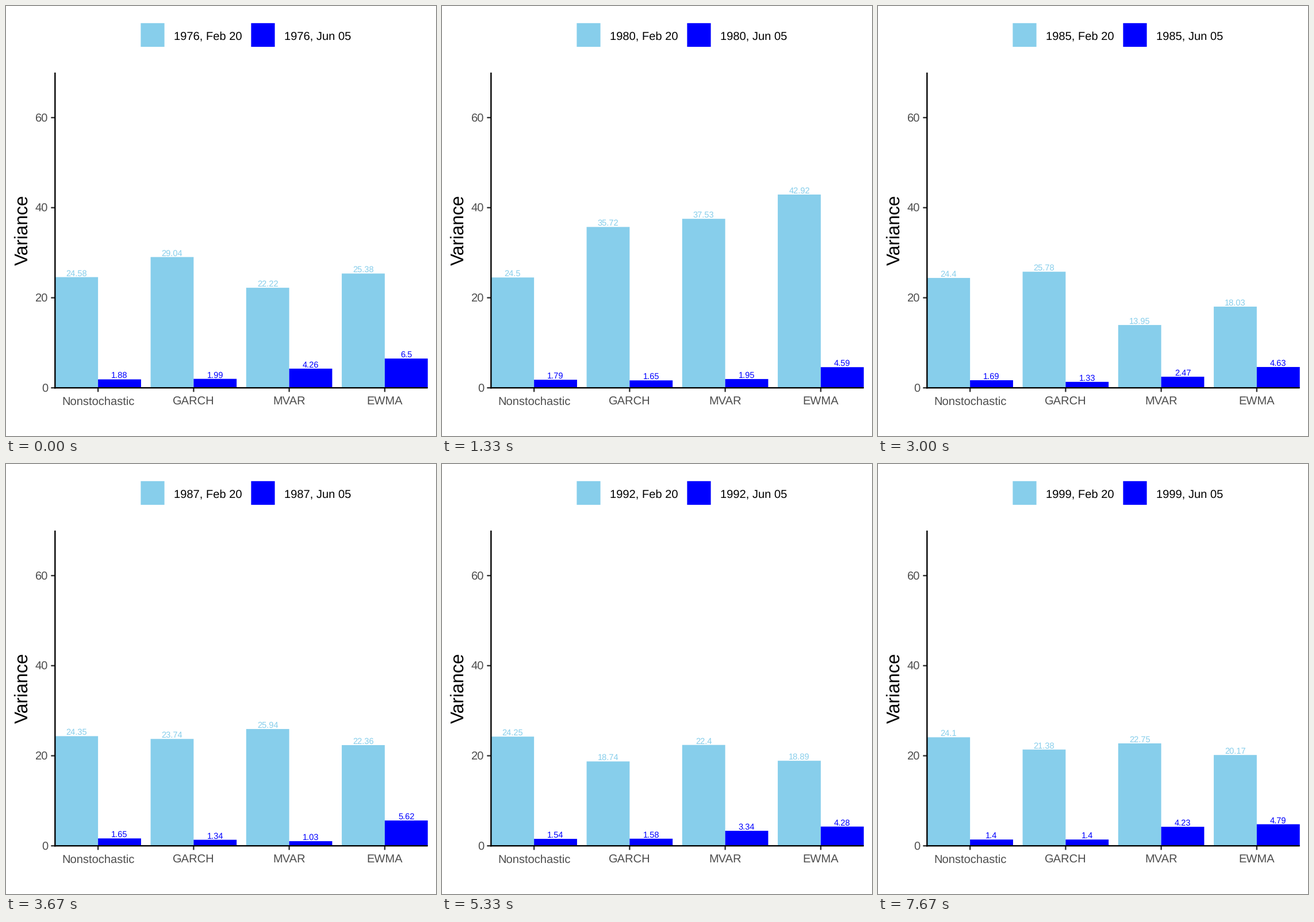
Write a matplotlib script that moves like this. It is 748 px wide and 748 px high and loops after 8 s.

```python
import matplotlib.pyplot as plt
import numpy as np
from matplotlib.animation import FuncAnimation
from matplotlib.patches import Rectangle

SIZE, DPI = 748, 100
PX = 72 / DPI
LOOP, STEP = 8000, 20
YEARS, FIRST_YEAR = 24, 1976
SKY, BLUE, GREY = "#87CEEB", "#0000FF", "#4D4D4D"
LEFT, RIGHT, TOP, BASE = 85.3, 733.7, 115.8, 664.2
UNIT = (BASE - TOP) / 70
PITCH = (RIGHT - LEFT) / 3.9
BAR = 0.45 * PITCH
MODELS = ["Nonstochastic", "GARCH", "MVAR", "EWMA"]

plt.rcParams["font.family"] = ["Liberation Sans", "DejaVu Sans"]
plt.rcParams["text.hinting"] = "none"

rng = np.random.default_rng(12)
k = np.arange(YEARS)
KEY_YEARS = [0, 4, 9, 13, 16, 19, 23]


def wander(*keys):
    """Series through the key points, with slight scatter in between."""
    scatter = rng.uniform(-0.1, 0.1, YEARS)
    scatter[KEY_YEARS] = 0
    return np.interp(k, KEY_YEARS, keys) * (1 + scatter)


def wave(period):
    return np.cos(2 * np.pi * k / period)


drift = 0.0209 * k
february = [
    24.584 - drift,
    wander(29.04, 35.72, 25.78, 21.3, 18.74, 26.06, 21.38),
    wander(22.22, 37.53, 13.95, 35.33, 22.4, 28.59, 22.75),
    wander(25.38, 42.92, 18.03, 30.78, 18.89, 27.15, 20.17),
]
june = [
    1.876 - drift,
    1.42 + 0.18 * wave(18) + 0.39 * np.exp(-k / 6),
    2.6 + 0.95 * wave(7.7) + 0.71 * wave(22),
    5.3 - 0.05 * k + 1.2 * wave(12.5),
]

fig = plt.figure(figsize=(SIZE / DPI, SIZE / DPI), dpi=DPI, facecolor="white")
ax = fig.add_axes([0, 0, 1, 1])
ax.set(xlim=(0, SIZE), ylim=(SIZE, 0))
ax.axis("off")


def label(x, y, text, px, color, ha="center", **kwargs):
    return ax.text(x, y, text, fontsize=px * PX, color=color,
                   ha=ha, va="baseline", **kwargs)


def box(x, y, w, h, color):
    return ax.add_patch(Rectangle((x, y), w, h, facecolor=color,
                                  linewidth=0, snap=False))


def stroke(xs, ys, color="black"):
    ax.plot(xs, ys, color=color, lw=2.4 * PX, solid_capstyle="butt",
            zorder=4, snap=False)


# Axes, ticks and their labels
for value in range(0, 61, 20):
    y = BASE - value * UNIT
    stroke([78.3, LEFT], [y, y], "#333333")
    label(73.3, y + 7.4, str(value), 20.2, GREY, "right")
centers = [LEFT + BAR + i * PITCH for i in range(len(MODELS))]
for x, name in zip(centers, MODELS):
    stroke([x, x], [BASE, 671.3], "#333333")
    label(x, 693.3, name, 20.2, GREY)
stroke([LEFT, LEFT], [TOP, BASE + 1.2])
stroke([LEFT - 1.2, RIGHT], [BASE, BASE])
label(37.6, (TOP + BASE) / 2, "Variance", 31.6, "black",
      rotation=90, rotation_mode="anchor")

# Legend
legend = []
for x, color, day in ((234.4, SKY, "Feb 20"), (426.4, BLUE, "Jun 05")):
    box(x, 29.8, 41.2, 41.2, color)
    legend.append((label(x + 57.4, 59.3, "", 20.1, "black", "left"), day))

# Bars with their value labels
bars = []
for x, light, dark in zip(centers, february, june):
    for left, series, color in ((x - BAR, light, SKY), (x, dark, BLUE)):
        bars.append((box(left, BASE, BAR, 0, color),
                     label(left + BAR / 2, BASE, "", 14.6, color), series))


def draw(i):
    # Each year begins on the step at or just before its third of a second
    year = (3 * i + 2) * STEP // 1000
    for text, day in legend:
        text.set_text(f"{FIRST_YEAR + year}, {day}")
    for rect, text, series in bars:
        top = BASE - series[year] * UNIT
        rect.set_y(top)
        rect.set_height(BASE - top)
        text.set_y(top - 2.2)
        text.set_text(f"{series[year]:.2f}".rstrip("0").rstrip("."))
    return []


anim = FuncAnimation(fig, draw, frames=LOOP // STEP, interval=STEP,
                     repeat=True, repeat_delay=0)
plt.show()
```
